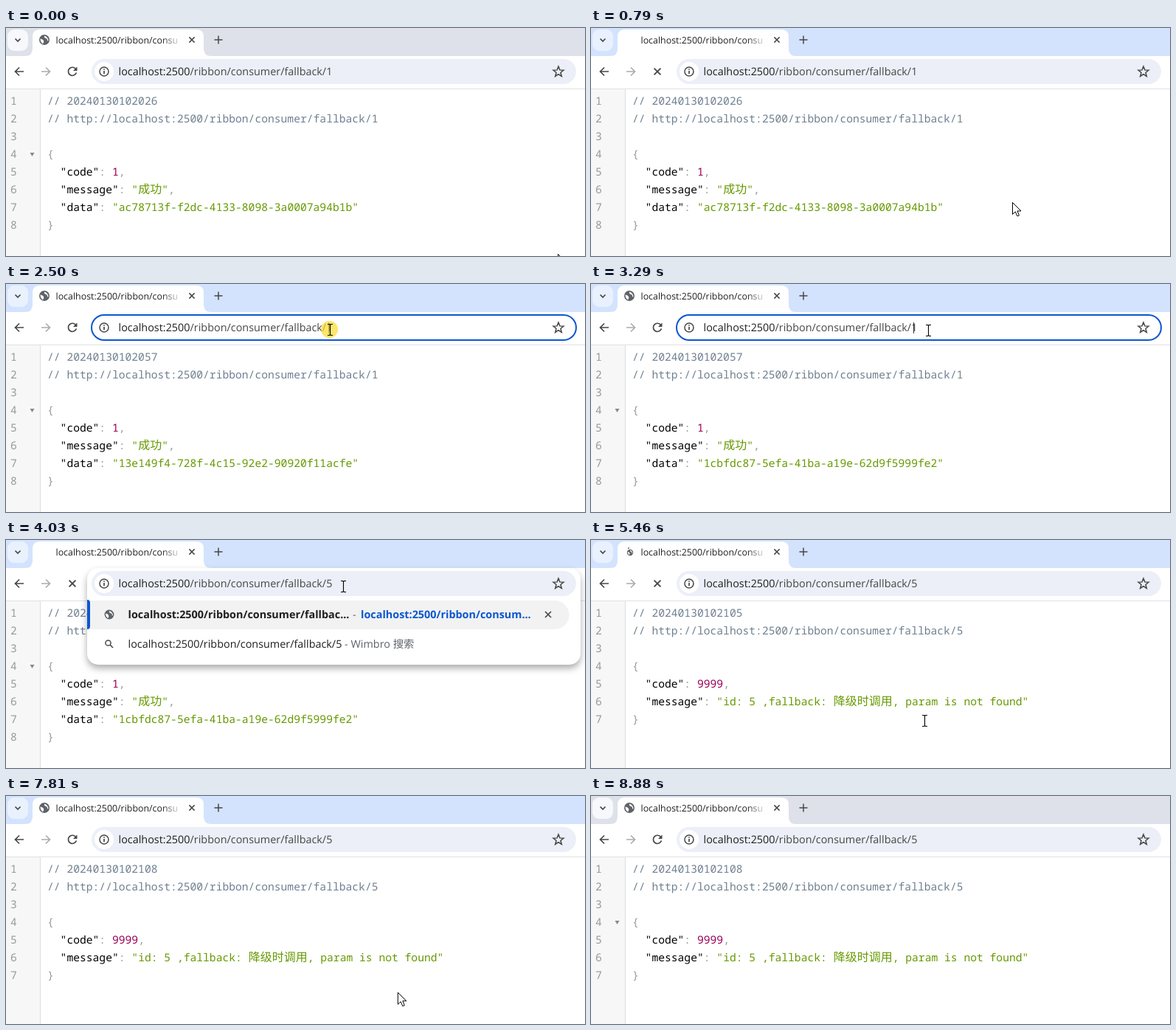
Write an HTML page that moves like this. It is 785x309 px and loops after 8.94 s.

```html
<!DOCTYPE html>
<html lang="zh">
<head>
<meta charset="utf-8">
<title>Ribbon fallback</title>
<style>
  html, body { margin: 0; width: 100%; height: 100%; overflow: hidden; background: #fff; }
  svg { display: block; width: 785px; height: 309px; }
  text { white-space: pre; text-rendering: geometricPrecision; }
  .ui { font: 14.4px "Open Sans", "Noto Sans CJK SC", sans-serif; fill: #1f1f1f; }
  .title { font-size: 12.4px; }
  .bold { font-weight: 700; }
  .path { fill: #474747; }
  .soft { fill: #5f6368; }
  .link { fill: #0b57d0; }
  .code { font: 14.662px "Noto Sans Mono", monospace; }
  .cjk { font: 16px "Noto Sans CJK SC", sans-serif; }
  .c { fill: #708090; } .p { fill: #999; } .k { fill: #000; } .s { fill: #690; } .n { fill: #905; }
  .line { fill: none; stroke: #474747; stroke-width: 1.7; }
  .popup { filter: drop-shadow(0 5px 5px rgba(0, 0, 0, .32)); }
</style>
</head>
<body>
<svg viewBox="0 0 785 309">
  <defs>
    <linearGradient id="fade">
      <stop offset="0" stop-color="#fff" stop-opacity="0"/>
      <stop offset="1" stop-color="#fff"/>
    </linearGradient>
    <g id="globe">
      <circle r="7" fill="#5f6368"/>
      <path d="M-5.5-1.5Q-2-1-1 1T-2 5.5Q-5.5 3-5.5-1.5ZM0-5.5Q-.5-2.5 2-2T4 1.5L5.5 1Q5-4 0-5.5Z" fill="#fff"/>
    </g>
    <path id="cross" d="M-4-4L4 4M4-4L-4 4"/>
    <path id="beam" d="M-3.5-7.5H-1L0-6.5L1-7.5H3.5M0-6.5V6.5M-3.5 7.5H-1L0 6.5L1 7.5H3.5" fill="none" stroke="#000" stroke-width="1.1"/>
    <path id="arrow" d="M0 0V16L3.8 12.5L6.5 18.5L9 17.5L6.5 11.5H11.5Z" fill="#fff" stroke="#000"/>
  </defs>
  <g id="scene"></g>
  <g id="pointer"></g>
</svg>
<script>
const LOOP = 8940;
const scene = document.getElementById('scene');
const pointer = document.getElementById('pointer');

const ids = [
  [860, 'ac78713f-f2dc-4133-8098-3a0007a94b1b'],
  [2150, 'b967e144-14c7-4e5f-8bdb-077a9d3fb0df'],
  [3290, '13e149f4-728f-4c15-92e2-90920f11acfe'],
  [LOOP, '1cbfdc87-5efa-41ba-a19e-62d9f5999fe2']
];
const stamps = [[860, '2026'], [4180, '2057'], [6460, '2105'], [7600, '2107'], [LOOP, '2108']];
const loads = [[720, 860], [1060, 1200], [1460, 1660], [1800, 1940], [2020, 2150], [4030, 4180],
  [5110, 5260], [5460, 5660], [5800, 5990], [6120, 6310], [6380, 6530], [6950, 7100], [7460, 7600]];
const folds = [[0, 720], [2430, 4110], [4500, 5110], [8100, LOOP]];
const moves = [[0, 748, 306], [70, 748, 306], [270, 571, 236], [1060, 571, 236], [1460, 469, 88],
  [1600, 469, 88], [1940, 439, 62], [2500, 439, 62], [2690, 446, 63], [3289, 446, 63], [3290, 457, 63],
  [4500, 457, 63], [4780, 452, 229], [5110, 452, 229], [5260, 452, 245], [7600, 452, 245],
  [8280, 706, 312], [LOOP, 706, 312]];

const until = (list, t) => list.find(e => t < e[0])[1];
const within = (list, t) => list.some(([a, b]) => t >= a && t < b);
const text = (x, y, cls, s) => `<text x="${x}" y="${y}" class="${cls}">${s}</text>`;
const span = (cls, s) => `<tspan class="${cls}">${s}</tspan>`;
const use = (id, x, y, scale = 1, more = '') =>
  `<use href="#${id}" transform="translate(${x} ${y}) scale(${scale})" ${more}/>`;
const line = (d, more = '') => `<path class="line" d="${d}" ${more}/>`;
const cjk = s => s.replace(/[\u4e00-\u9fff]+/g, m => span('cjk', m));
const field = (key, cls, value, end = '') =>
  '  ' + span('k', `"${key}"`) + span('p', ': ') + span(cls, cjk(value)) + span('p', end);

function page(t) {
  if (t >= 6460 && t < 6530) return '';
  const failed = t >= 4180;
  const rows = [
    span('c', '// 2024013010' + until(stamps, t)),
    span('c', '// http://localhost:2500/ribbon/consumer/fallback/' + (failed ? 5 : 1)),
    '', span('p', '{')
  ];
  if (failed) rows.push(
    field('code', 'n', '9999', ','),
    field('message', 's', '"id: 5 ,fallback: 降级时调用, param is not found"'));
  else rows.push(
    field('code', 'n', '1', ','),
    field('message', 's', '"成功"', ','),
    field('data', 's', `"${until(ids, t)}"`));
  rows.push(span('p', '}'));
  return '<path d="M0 83H46V309H0Z" fill="#f7f7f7"/><path d="M46.5 83V309" stroke="#ddd"/>' +
    rows.map((r, i) => text(6, 104 + i * 24, 'code p', i + 1) + text(56, 104 + i * 24, 'code', r)).join('') +
    (within(folds, t) ? '<path d="M32.5 169H38.5L35.5 174Z" fill="#888"/>' : '');
}

function tabs(t, loading) {
  const active = t >= 70 && t < 8880;
  const starting = t >= 5460 && t < 5530;
  let icon = use('globe', 52, 16);
  if (starting) icon = use('globe', 53, 17, .6) + '<circle cx="51" cy="11" r="1" fill="#5f6368"/>';
  else if (loading) icon = '';
  return `<path d="M0 0H785V38H0Z" fill="${active ? '#d3e3fd' : '#dee1e9'}"/>
    <rect x="2" y="2" width="28" height="29" rx="9" fill="${active ? '#e9f1fe' : '#f7f8fb'}"/>
    ${line('M12.5 14.5L16 18L19.5 14.5')}
    <path d="M26 38Q36 38 36 28V12Q36 2 46 2H258Q268 2 268 12V28Q268 38 278 38Z" fill="#fff"/>
    ${icon}${text(67.5, 20.5, 'ui title', 'localhost:2500/ribbon/consu')}
    <path d="M212 6H238V30H212Z" fill="url(#fade)"/>
    ${use('cross', 252, 16, .9, 'class="line"')}
    ${line('M282.5 16H293.5M288 10.5V21.5', 'style="stroke-width:1.5"')}`;
}

function popup() {
  return `<rect class="popup" x="110" y="38" width="669" height="131" rx="15" fill="#fff"/>
    <path d="M110 82H744A19.5 19.5 0 0 1 744 121H110Z" fill="#f2f2f2"/>
    <path d="M110 81Q114 81 114 85V117Q114 121 110 121Z" fill="#0b57d0"/>
    ${use('globe', 140, 101, .92)}
    ${text(165.5, 106, 'ui bold', 'localhost:2500/ribbon/consumer/fallbac...')}
    ${text(470, 106, 'ui soft', '-')}
    ${text(481, 106, 'ui bold link', 'localhost:2500/ribbon/consum...')}
    ${use('cross', 735, 101, 1, 'class="line"')}
    <circle class="line" cx="138.5" cy="139.5" r="3.6" style="stroke-width:1.5"/>
    ${line('M141 142L145 146')}`;
}

function toolbar(t, loading) {
  const focus = t >= 2430 && t < 3700;
  const open = t >= 3700 && t < 4110;
  const digit = t < 3700 ? '1' : t < 3770 ? '' : '5';
  const url = 'localhost:2500' + span('path', '/ribbon/consumer/fallback/' + digit);
  const fill = focus || open && t < 4030 ? '#fff' : '#eceff8';
  const star = Array.from({ length: 10 }, (_, i) => {
    const r = i % 2 ? 3.2 : 7.4, a = i * Math.PI / 5;
    return (749 + r * Math.sin(a)).toFixed(1) + ' ' + (59.5 - r * Math.cos(a)).toFixed(1);
  }).join('L');
  const reload = line('M94.6 55.6A5.6 5.6 0 1 0 95.4 60.5') +
    '<path d="M96.5 52.5V58H91Z" fill="#474747"/>';
  return `<path d="M0 38H785V82H0Z" fill="#fff"/><path d="M0 82.5H785" stroke="#dfe1e5"/>
    ${line('M24 59H13M18 53.5L12.5 59L18 64.5')}
    ${line('M48 59H59M54 53.5L59.5 59L54 64.5', 'style="stroke:#a9acb0"')}
    ${loading ? use('cross', 90, 59, 1.1, 'class="line"') : reload}
    ${open ? popup() + text(165.5, 145.5, 'ui', 'localhost:2500/ribbon/consumer/fallback/' + digit +
      span('soft', ' - Wimbro 搜索')) : ''}
    <rect x="116" y="42" width="657" height="34" rx="17" fill="${fill}"
      ${focus ? 'stroke="#0b57d0" stroke-width="2"' : ''}/>
    <circle cx="133" cy="59" r="13" fill="#fff"/>
    <circle class="line" cx="133" cy="59" r="6" style="stroke-width:1.5"/>
    ${line('M133 58V62.3M133 55.2V56.8')}
    ${text(152.5, 64, 'ui', url)}
    ${focus ? '<path d="M437.5 52V67" stroke="#333"/>' : ''}
    ${line('M' + star + 'Z', 'style="stroke-width:1.5"')}`;
}

function place(t) {
  const i = moves.findIndex(m => t < m[0]);
  const [a, x0, y0] = moves[i - 1], [b, x1, y1] = moves[i];
  const k = (t - a) / (b - a);
  return [x0 + (x1 - x0) * k, y0 + (y1 - y0) * k];
}

let last = '';
function draw(now) {
  const t = now % LOOP;
  const loading = within(loads, t);
  const html = page(t) + tabs(t, loading) + toolbar(t, loading);
  if (html !== last) scene.innerHTML = last = html;

  const [x, y] = place(t);
  const beam = t >= 1800 && t < 7320;
  const click = t >= 2430 && t < 2890;
  pointer.innerHTML =
    (click ? `<circle cx="${x - .5}" cy="${y - .5}" r="11.5" fill="#fbdc30" opacity=".7"/>` : '') +
    (beam ? use('beam', Math.round(x) + .5, Math.round(y)) : use('arrow', x + .5, y + .5));
  requestAnimationFrame(() => draw(performance.now() - start));
}
const start = performance.now();
draw(0);
</script>
</body>
</html>
```
